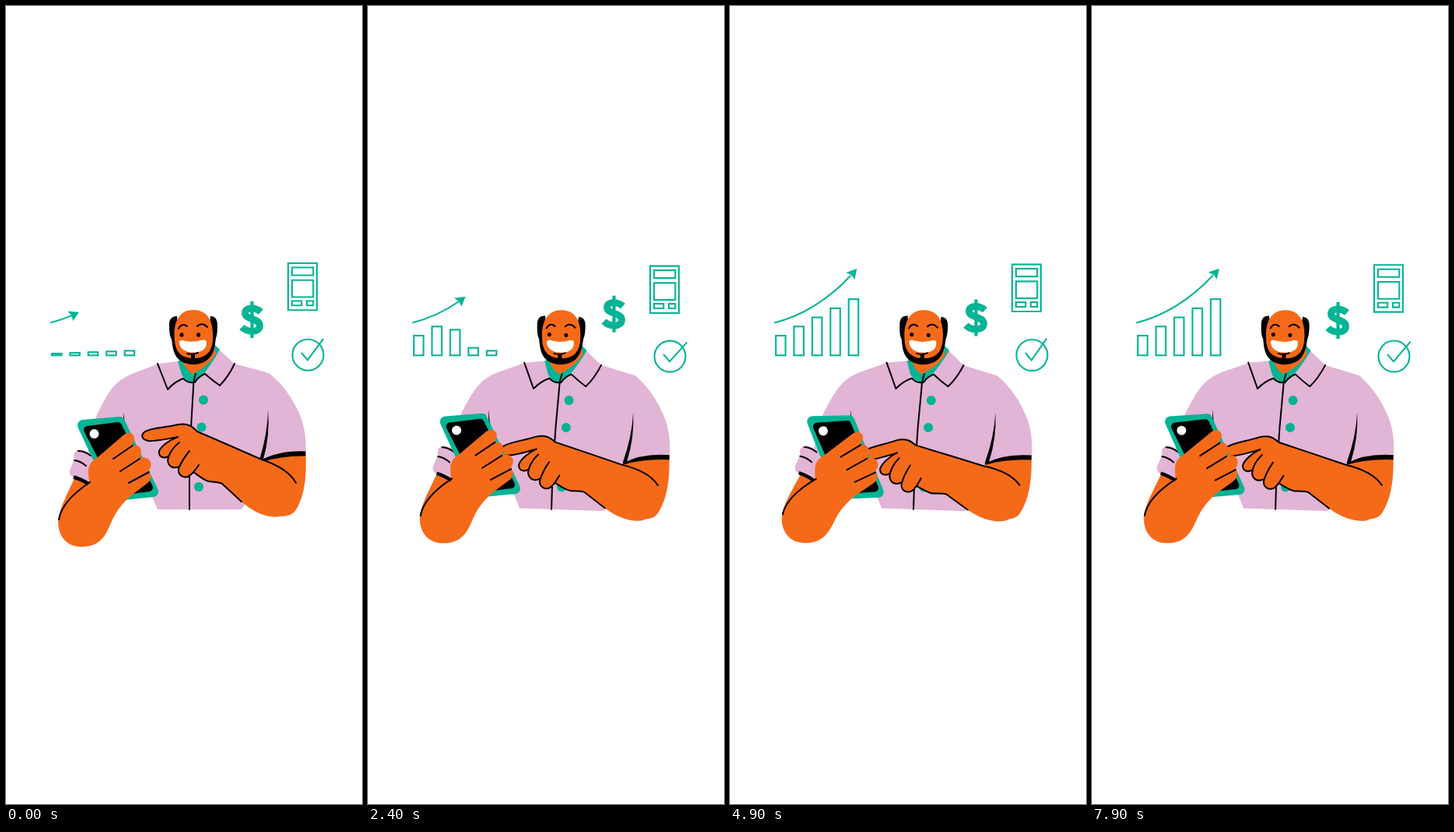
An HTML page for the animation above (8 s loop, 458x1024 px).

```html
<!DOCTYPE html>
<html lang="en">
<head>
<meta charset="utf-8">
<title>Man with phone</title>
<style>
  html, body { margin: 0; width: 100%; height: 100%; overflow: hidden; background: #fff; }
  svg { display: block; width: 100%; height: 100%; }
  .teal { fill: #04b495; }
  .skin { fill: #f56a19; }
  .shirt { fill: #e2b4d5; }
  .ink { fill: none; stroke: #000; stroke-width: 2; stroke-linecap: round; stroke-linejoin: round; }
  .icon { fill: none; stroke: #04b495; stroke-width: 2.1; }
  .phone { stroke-linejoin: round; }
</style>
</head>
<body>
<svg viewBox="0 0 458 1024" preserveAspectRatio="xMidYMid meet">
  <g id="bars" class="icon"></g>
  <path id="shaft" class="icon"/>
  <path id="head" class="teal" d="M0 0L-13 -7.2L-10.5 0L-12 7.2Z"/>

  <g id="device" class="icon">
    <path d="M363 330H400V390.300H363Z"/>
    <path d="M368 335.500H395.300V345.500H368ZM368 351.700H395.300V373.500H368ZM368 378.500H380.300V384.300H368ZM387 378.500H395.300V384.300H387Z"/>
  </g>
  <g id="dollar" class="icon">
    <path style="stroke-width:8.800" d="M328 392.500C321 386.500 307.500 386 307.500 394C307.500 403 326.500 400.500 326.500 410C326.500 419.500 311 419.500 303.500 412"/>
    <path style="stroke-width:4.200" d="M316.500 379V426"/>
  </g>
  <g id="badge" class="icon">
    <circle cx="388.500" cy="447.700" r="20"/>
    <path id="check"/>
  </g>

  <g id="body">
    <path class="shirt" d="M196 459L165 471C141 480 134 493 126 507C119 520 114 530 112 540L105 575L188 630L195 646H303L310 635L385.500 577C387 552 383 533 374 516C364 496 352 482 338 471L294 459L274 441L244 478L221 456Z"/>
    <path class="teal" d="M221 456L226 473Q231 482 242 483Q255 476 275 441L268 434Z"/>
    <path class="skin" d="M225 450L229 460Q233 468 240 472Q260 463 270 446L266 430Z"/>
    <path class="ink" d="M195 459L208 492Q217 482 228 478Q234 484 241 483M244 472Q241 480 241 490L238 541L236 600V646M243 483Q247 476 256 472Q265 480 275 487Q286 476 294 459"/>
    <g class="teal">
      <circle cx="254" cy="505.500" r="6"/>
      <circle cx="251.500" cy="540.500" r="6"/>
      <circle cx="248" cy="617" r="6"/>
    </g>
    <path d="M151 521Q152 535 156 548L153.500 546Q150.500 532 151 521Z"/>
    <path d="M337 518Q340 550 331 582L325.500 584Q337 548 337 518Z"/>

    <path d="M220 398C213 398 210 402 210 409C210 420 211 428 216 431L222 425ZM263 398C270 398 272 403 272 410C272 421 271 428 266 431L260 425Z"/>
    <path d="M213 424C214 446 219 459 241 460C263 459 269 445 270 424Z"/>
    <path class="skin" d="M217 429C215 412 219 390 241 390C264 390 267 412 266 429C265 444 257 452 241 452C225 452 218 443 217 429Z"/>
    <path d="M223 431C224 428 228 429 231 430Q241 432 251 429C255 428 258 428 258 432C258 441 251 444.500 240 444.500C230 444.500 223 439 223 431Z" fill="#fff"/>
    <path class="ink" d="M222 414Q226 406 233 411M246 411Q252 405 259 412M233 446Q240 448 247 445"/>
    <path d="M238 446H243V455H238Z"/>
    <ellipse class="eye" cx="226" cy="422" rx="2.500" ry="2.700"/>
    <ellipse class="eye" cx="247.600" cy="422" rx="2.500" ry="2.700"/>

    <path class="skin" d="M328 584Q350 576 385.500 575C387 604 384 630 372 648C364 658 342 656 335 648Z"/>
    <path d="M326 584Q350 570 385.500 571.500V577.500Q352 577 326 586Z"/>
    <g id="rightArm">
      <path class="skin" d="M221 553C205 556 190 559 183 558C174 556 173 550 179 546C187 541 205 541 222 537C236 535 241 541 246 546L290 565L329 582C350 588 366 599 373 612C380 630 370 650 350 655.500C330 657 312 644 303 636L278 613C268 611 261 612 241 598C238 604 233 605 229 604.500C221 602 221 597 223 591C214 594 207 590 208 580C201 582 195 577 197 571C200 564 212 556 221 553Z"/>
      <path class="ink" d="M221 553C205 556 190 559 183 558C174 556 173 550 179 546C187 541 205 541 222 537C236 535 241 541 246 546L290 565L329 582C350 589 366 599 373 612"/>
      <path class="ink" d="M221 553C212 556 200 564 197 571C196 579 203 581 209 578M223 560C215 566 209 575 208 583C209 592 216 594 223 591M236 571C231 577 225 586 222 594C221 602 228 606 234 604C240 601 243 596 248 589M241 598C250 604 255 609 261 610C270 611 274 611 278 613L303 636"/>
    </g>

    <path class="shirt" d="M96 569C88 570 86 575 88 581L82 596C81 601 84 604 88 606L110 616L114 575Z"/>
    <path class="ink" d="M93 571Q101 571 109 577M88 583Q96 584 103 590"/>
    <g id="leftArm">
      <g class="phone">
        <path class="teal" d="M99 538L146 534L189 623L141 628Z" stroke="#04b495" stroke-width="14"/>
        <path d="M105 544L144 539L184 618L146 623Z" stroke="#000" stroke-width="10"/>
        <circle cx="113.500" cy="549" r="6" fill="#fff"/>
      </g>
      <path class="skin" d="M106 600C105 588 112 583 118 579L152 550C158 545 167 549 165 557L162 564C168 562 177 566 173 577L172 580C180 577 189 583 186 592L183 598C189 602 187 609 181 613L160 629C150 638 142 648 137 659C130 674 125 694 97 694C76 694 65 677 67.500 657C70 642 80 624 88 606L107 613Z"/>
      <path class="ink" d="M138 581L163 564M147 597L172 581M158 612L184 598M108 611C90 623 71 640 68 659"/>
    </g>
    <path d="M87 604.500Q96 607 106 613" fill="none" stroke="#000" stroke-width="4.500"/>
  </g>
</svg>
<script>
const LOOP = 8000, STEP = 100;
const $ = id => document.getElementById(id);
const lerp = (a, b, u) => a + (b - a) * u;

// 0 before start, 1 after end, sine ease between.
function ramp(t, start, end) {
  const u = Math.min(1, Math.max(0, (t - start) / (end - start)));
  return (1 - Math.cos(Math.PI * u)) / 2;
}
const swing = (t, period) => 1 - Math.cos(2 * Math.PI * t / period);

const motion = {
  lean: t => 2 * (ramp(t, 0, 2900) - ramp(t, 7400, 10300)),
  // The finger lowers, presses, lifts and lowers again.
  rightArm: t => -6.6 * ramp(t, 0, 2400) - 1.9 * ramp(t, 4100, 4900)
    + 7.4 * ramp(t, 5000, 6500) - 5.8 * ramp(t, 6700, 8000),
  leftArm: t => -1.4 * ramp(t, 0, 2400) + 3.3 * ramp(t, 3500, 5300) - 3.2 * ramp(t, 6800, 8300),
  dollar: t => -7.4 * (ramp(t, 0, 2600) - ramp(t, 3200, 6000)) + ramp(t, 5900, 7500),
  device: t => 2.1 * swing(t, 6250),
  badge: t => swing(t, 5600),
  checkEnd: t => 1.7 * Math.sin(2 * Math.PI * (t - 400) / 6800) - .2,
  arrow: t => 94 + 69.5 * ramp(t, 0, 5100),
  eyeOpen: t => 1 - .7 * (ramp(t, 6400, 6600) - ramp(t, 6800, 7000))
};

const BASE = 448.3;
const bars = Array.from({ length: 5 }, (_, i) => {
  const bar = document.createElementNS('http://www.w3.org/2000/svg', 'rect');
  bar.setAttribute('x', 58.9 + 23.45 * i);
  bar.setAttribute('width', 12.5);
  $('bars').append(bar);
  return bar;
});

const START = [57, 406.5], BEND = [115.8, 391.8], END = [163.5, 337];
const mix = (p, q, u) => [lerp(p[0], q[0], u), lerp(p[1], q[1], u)];

function drawArrow(tipX) {
  // Solve the quadratic curve for the tip's x.
  const a = START[0] - 2 * BEND[0] + END[0], b = 2 * (BEND[0] - START[0]);
  const u = (-b + Math.sqrt(b * b + 4 * a * (tipX - START[0]))) / (2 * a);
  const point = v => mix(mix(START, BEND, v), mix(BEND, END, v), v);
  const tip = point(u), neckAt = u - .08, neck = point(neckAt);
  const angle = Math.atan2(tip[1] - neck[1], tip[0] - neck[0]) * 180 / Math.PI;
  $('shaft').setAttribute('d', `M${START}Q${mix(START, BEND, neckAt)} ${neck}`);
  $('head').setAttribute('transform', `translate(${tip}) rotate(${angle})`);
}

function drawBar(bar, i, t) {
  const begin = 150 + 650 * i;
  const top = lerp(446 - .9 * i, 423 - 11.7 * i, ramp(t, begin, begin + 1600));
  bar.setAttribute('y', top);
  bar.setAttribute('height', BASE - top);
}

function draw(t) {
  const turn = (id, angle, x, y) => $(id).setAttribute('transform', `rotate(${angle} ${x} ${y})`);
  turn('body', motion.lean(t), 240, 646);
  turn('rightArm', motion.rightArm(t), 360, 622);
  turn('leftArm', motion.leftArm(t), 97, 662);
  for (const id of ['device', 'dollar', 'badge']) {
    $(id).setAttribute('transform', `translate(0 ${motion[id](t)})`);
  }

  const end = motion.checkEnd(t);
  $('check').setAttribute('d', `M380 445L388 454.3L${409 + end} ${428 + end}`);
  drawArrow(motion.arrow(t));
  bars.forEach((bar, i) => drawBar(bar, i, t));
  document.querySelectorAll('.eye').forEach(eye => eye.setAttribute('ry', 2.7 * motion.eyeOpen(t)));
}

const begin = performance.now();
function frame() {
  const t = (performance.now() - begin) % LOOP;
  draw(Math.floor(t / STEP) * STEP);
  requestAnimationFrame(frame);
}
frame();
</script>
</body>
</html>
```
